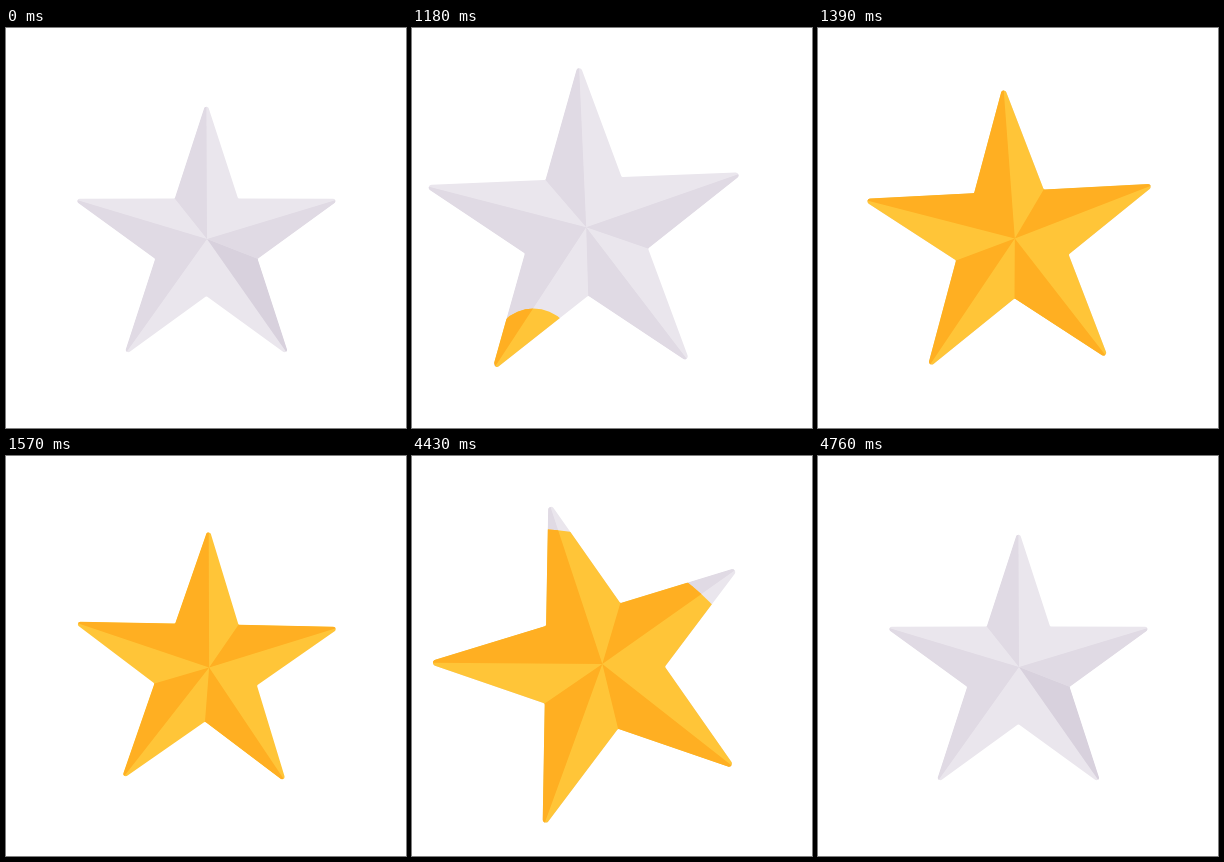
Write an HTML page with a canvas that moves like this. It is 400 px wide and 400 px high and loops after 4.82 s.

```html
<!DOCTYPE html>
<html lang="en">
<head>
<meta charset="utf-8">
<title>Star toggle</title>
<style>
  html, body { margin: 0; width: 100%; height: 100%; overflow: hidden; background: #fff; }
  canvas { display: block; width: 100vw; height: 100vh; }
</style>
</head>
<body>
<canvas id="stage" width="400" height="400"></canvas>
<script>
const ctx = document.getElementById('stage').getContext('2d');

const LOOP = 4820, STEP = 30, LAST = 18;
const FILL_AT = 1030, HOLD_AT = 1570, CLEAR_AT = 4220, REST_AT = 4760;

const GREY = { light: '#eae6ed', dark: '#e0dae4', deep: '#d8d1dd' };
const GOLD = { light: '#ffc538', dark: '#ffaf22' };
const DARK_FACETS = [1, 4, 6, 8, 9];
const REST_FACETS = [1, 4, 8, 9];
const DEEP_FACET = 5;

const REST = [200.4, 214.2, 0, 1];
// Pose on every second step: x, y, degrees, scale
const KEYS = [
  [187.6, 206.8, -4, 1.002],
  [177.5, 204.2, -8, 1.03],
  [173.6, 203, -7, 1.14],
  [174.8, 203.4, 5.5, 1.255],
  [179.8, 207, 31.3, 1.285],
  [186.8, 209.6, 55, 1.225],
  [193.4, 211.2, 69, 1.1],
  [197.8, 212.1, 74.8, 1.005],
  [199.5, 212.3, 73.9, 0.99],
  [200, 211.8, 73.1, 1]
];

// Ten outline points, starting at the left tip and going clockwise
const POINTS = Array.from({ length: 10 }, (_, i) => {
  const a = (-162 + 36 * i) * Math.PI / 180;
  const r = i % 2 ? 53.9 : 141;
  return [r * Math.cos(a), r * Math.sin(a)];
});
const HUB = [0.6, -3.1];

const outline = new Path2D();
const mid = (a, b) => [(a[0] + b[0]) / 2, (a[1] + b[1]) / 2];
outline.moveTo(...mid(POINTS[9], POINTS[0]));
POINTS.forEach((p, i) => {
  outline.arcTo(...p, ...mid(p, POINTS[(i + 1) % 10]), i % 2 ? 1.5 : 2.5);
});
outline.closePath();

function facets(list) {
  const path = new Path2D();
  for (const i of list) {
    path.moveTo(...HUB);
    path.lineTo(...POINTS[i]);
    path.lineTo(...POINTS[(i + 1) % 10]);
    path.closePath();
  }
  return path;
}

function spline(a, b, c, d, u) {
  return b + u / 2 * (c - a + u * (2 * a - 5 * b + 4 * c - d + u * (3 * (b - c) + d - a)));
}

function poseAt(n) {
  if (n < 0) return REST;
  const i = Math.floor(n / 2), u = n / 2 - i;
  const key = k => KEYS[Math.max(0, Math.min(KEYS.length - 1, k))];
  return REST.map((_, j) =>
    spline(key(i - 1)[j], key(i)[j], key(i + 1)[j], key(i + 2)[j], u));
}

function drawStar([x, y, deg, scale], tone, dark, deep) {
  ctx.save();
  ctx.translate(x, y);
  ctx.rotate(deg * Math.PI / 180);
  ctx.scale(scale, scale);
  ctx.clip(outline);
  ctx.fillStyle = tone.light;
  ctx.fillRect(-150, -150, 300, 300);
  ctx.fillStyle = tone.dark;
  ctx.fill(facets(dark));
  if (deep) {
    ctx.fillStyle = tone.deep;
    ctx.fill(facets([DEEP_FACET]));
  }
  ctx.restore();
}

function stepAt(t) {
  if (t < FILL_AT || t >= REST_AT) return -1;
  if (t < HOLD_AT) return Math.floor((t - FILL_AT) / STEP);
  if (t < CLEAR_AT) return LAST;
  return LAST - 1 - Math.floor((t - CLEAR_AT) / STEP);
}

function draw(t) {
  const n = stepAt(t), pose = poseAt(n);
  const radius = 41.5 * (n - 4);
  const full = n >= 13;
  ctx.fillStyle = '#fff';
  ctx.fillRect(0, 0, 400, 400);
  if (!full) drawStar(pose, GREY, n < 0 ? REST_FACETS : DARK_FACETS, n < 0);
  if (radius <= 0) return;
  ctx.save();
  if (!full) {
    ctx.beginPath();
    ctx.arc(121.5, 322, radius, 0, 2 * Math.PI);
    ctx.clip();
  }
  drawStar(pose, GOLD, DARK_FACETS);
  ctx.restore();
}

function tick() {
  draw(performance.now() % LOOP);
  requestAnimationFrame(tick);
}
tick();
</script>
</body>
</html>
```
